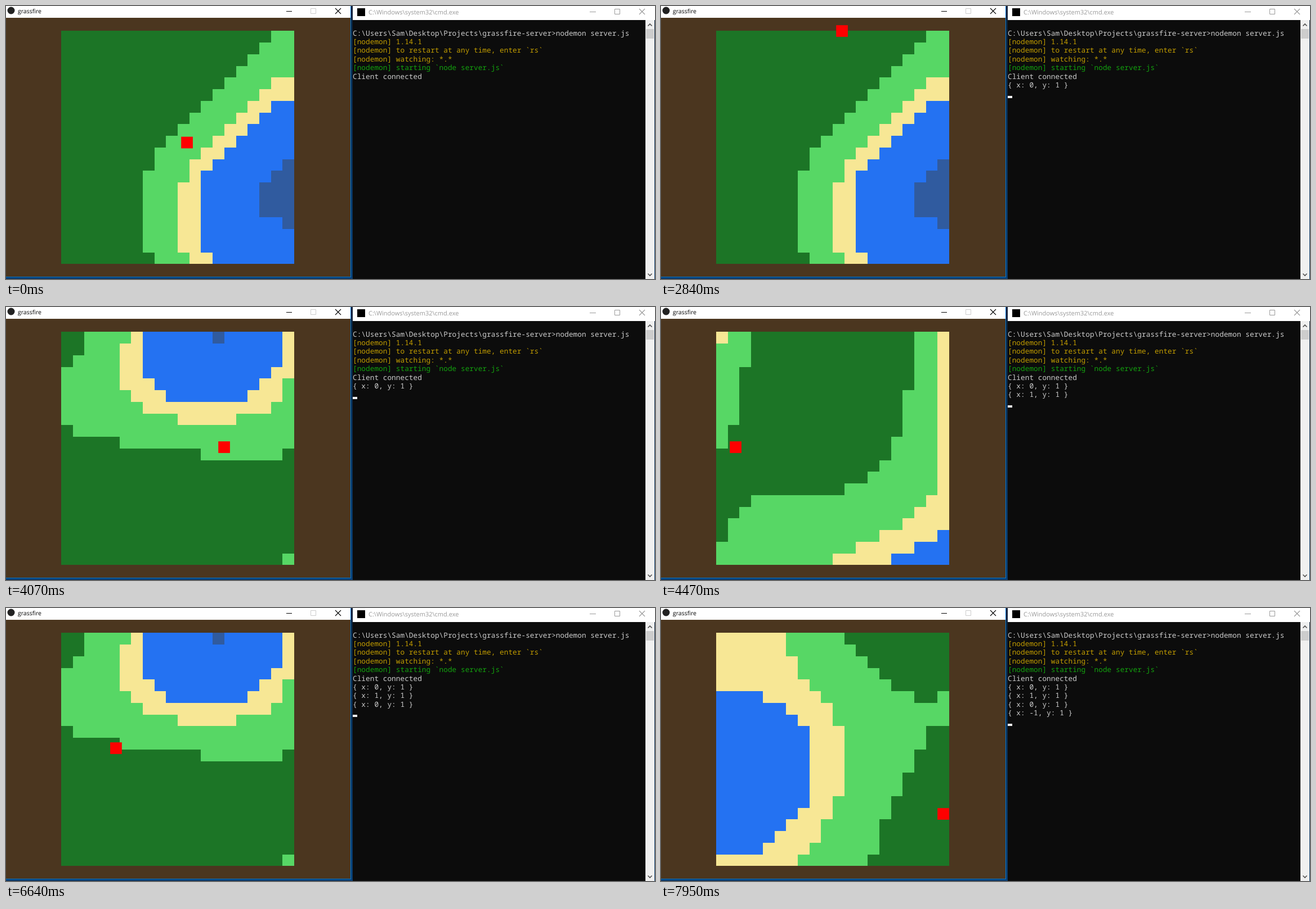
An HTML page with a canvas for the animation above (8 s loop, 1153x486 px).

```html
<!DOCTYPE html>
<html lang="en">
<head>
<meta charset="utf-8">
<title>grassfire</title>
<style>
  html, body { margin: 0; width: 100%; height: 100%; overflow: hidden; background: #0c0c0c; }
  canvas { display: block; }
</style>
</head>
<body>
<canvas id="stage" width="1153" height="486"></canvas>
<script>
const ctx = document.getElementById('stage').getContext('2d');
const LOOP = 8000;
const TICK = 77;   // ms between two moves of the player
const CELL = 20.7;

const DARK = '#1c7526', GRASS = '#57d765', SAND = '#f7e795', WATER = '#2472f2', DEEP = '#305b9f';
const UI_FONT = '"Open Sans", "Noto Sans", sans-serif';
const MONO_FONT = '12.8px "Noto Sans Mono", "Liberation Mono", monospace';

// Outlines are in cells of the 20 x 20 board.
const cellX = n => Math.round(98 + CELL * n);
const cellY = n => Math.round(44.3 + 20.75 * n);

function outline(cells) {
  return new Path2D(cells.replace(/([MHV,])(\d+)/g, (_, op, n) =>
    op + (op === 'M' || op === 'H' ? cellX(n) : cellY(n))));
}

function makeMap(base, ...layers) {
  return [[base, 'M0,0H20V20H0Z'], ...layers].map(([color, cells]) => [color, outline(cells)]);
}

const coast = makeMap(DARK,
  [GRASS, 'M20,0H18V1H17V2H16V3H15V4H14V5H13V6H12V7H11V8H10V9H9V10H8V12H7V19H8V20H20Z'],
  [SAND, 'M20,4H18V5H17V6H16V7H15V8H14V9H13V10H12V11H11V13H10V19H11V20H20Z'],
  [WATER, 'M20,6H18V7H17V8H16V9H15V10H14V11H13V12H12V19H13V20H20Z'],
  [DEEP, 'M20,11H19V12H18V13H17V16H19V17H20Z']);

const bay = makeMap(DARK,
  [GRASS, 'M2,0H20V10H19V11H12V10H5V9H1V8H0V3H1V2H2ZM19,19H20V20H19Z'],
  [SAND, 'M6,0H20V4H19V6H18V7H15V8H10V7H7V6H6V5H5V1H6Z'],
  [WATER, 'M7,0H19V3H18V4H17V5H16V6H9V5H8V4H7Z'],
  [DEEP, 'M13,0H14V1H13Z']);

const forest = makeMap(GRASS,
  [DARK, 'M3,0H17V5H16V9H15V11H14V12H13V13H11V14H3V15H2V16H1V18H0V10H1V8H2V3H3Z'],
  [SAND, 'M0,0H1V1H0ZM19,0H20V20H10V19H12V18H14V17H16V16H17V15H18V14H19Z'],
  [WATER, 'M19,17H20V20H15V19H17V18H19Z']);

const lake = makeMap(DARK,
  [GRASS, 'M0,0H11V1H12V2H13V3H14V4H15V5H17V6H19V5H20V8H18V10H17V12H16V14H15V16H14V19H13V20H0Z'],
  [SAND, 'M0,0H6V2H7V4H8V5H9V6H10V8H11V14H10V16H9V18H8V19H7V20H0Z'],
  [WATER, 'M0,5H4V6H6V7H7V8H8V15H7V16H6V17H5V18H4V19H0Z']);

const maps = [[0, coast], [2920, bay], [4470, forest], [5630, bay], [6950, lake]];

// start time, number of ticks, x and y reached at the last tick
const moves = [
  [0, 1, 311, 232.5], [1140, 1, 311, 250], [2150, 7, 311, 50], [2840, 1, 311, 34],
  [2920, 1, 311, 413], [3530, 6, 311, 239], [3990, 2, 377, 239], [4145, 3, 469, 239],
  [4390, 1, 491, 239],
  [4470, 1, 122, 239], [4540, 1, 148, 239], [4940, 3, 230, 239], [5240, 4, 113, 239],
  [5550, 1, 98, 239],
  [5630, 1, 477, 239], [6010, 11, 120, 239], [6870, 1, 98, 239],
  [6950, 1, 466, 239], [7020, 1, 450, 239], [7480, 2, 491, 239], [7710, 4, 491, 356]
];

const PLAIN = '#cccccc', YELLOW = '#c19c00', GREEN = '#13a10e';
const banner = [
  [PLAIN, 'C:\\Users\\Sam\\Desktop\\Projects\\grassfire-server>nodemon server.js'],
  [YELLOW, '[nodemon] 1.14.1'],
  [YELLOW, '[nodemon] to restart at any time, enter `rs`'],
  [YELLOW, '[nodemon] watching: *.*'],
  [GREEN, '[nodemon] starting `node server.js`'],
  [PLAIN, 'Client connected']
];
const messages = [
  [2840, '{ x: 0, y: 1 }'], [4390, '{ x: 1, y: 1 }'],
  [5550, '{ x: 0, y: 1 }'], [6870, '{ x: -1, y: 1 }']
];

function rect(color, x, y, w, h) {
  ctx.fillStyle = color;
  ctx.fillRect(x, y, w, h);
}

function text(color, font, str, x, y) {
  ctx.fillStyle = color;
  ctx.font = font;
  ctx.fillText(str, x, y);
}

function stroke(color, width, d) {
  ctx.strokeStyle = color;
  ctx.lineWidth = width;
  ctx.stroke(new Path2D(d));
}

const desktop = ctx.createLinearGradient(0, 0, 0, 486);
desktop.addColorStop(0, '#0a2038');
desktop.addColorStop(1, '#0a3c6e');

function drawGameWindow() {
  rect(desktop, 0, 0, 1153, 486);
  rect('#4b361f', 0, 0, 612, 482);
  rect('#ffffff', 0, 0, 612, 21);
  rect('#0078d7', 612, 0, 1, 483);
  rect('#0078d7', 0, 482, 613, 1);
  ctx.fillStyle = '#222222';
  ctx.beginPath();
  ctx.arc(9, 8, 6.5, 0, 2 * Math.PI);
  ctx.fill();
  text('#000000', '10.5px ' + UI_FONT, 'grassfire', 21, 13);
  stroke('#000000', 1, 'M498 9.5H508');
  stroke('#cccccc', 1, 'M541.5 4.5h9v9h-9z');
  stroke('#000000', 1.1, 'M585 4l10 10m0-10l-10 10');
}

function drawConsoleWindow() {
  rect('#0c0c0c', 616, 0, 536, 486);
  rect('#ffffff', 616, 0, 537, 25);
  rect('#000000', 624, 4, 14, 14);
  text('#999999', '11px ' + UI_FONT, 'C:\\Windows\\system32\\cmd.exe', 644, 15);
  stroke('#999999', 1, 'M1037 10.5h11M1081.5 5.5h9v9h-9z');
  stroke('#999999', 1.1, 'M1125 5l10 10m0-10l-10 10');
  rect('#f0f0f0', 1136, 25, 16, 461);
  rect('#cdcdcd', 1137, 41, 14, 17);
  stroke('#505050', 1.6, 'M1140.5 35.5l3.5-3.5 3.5 3.5M1140.5 476.5l3.5 3.5 3.5-3.5');
}

function drawConsoleText(t) {
  const sent = messages.filter(([at]) => t >= at).map(([, str]) => [PLAIN, str]);
  const lines = banner.concat(sent);
  lines.forEach(([color, str], i) => text(color, MONO_FONT, str, 616, 52.5 + 15.4 * i));
  if (sent.length) rect('#f2f2f2', 616, Math.round(51.7 + 15.4 * lines.length), 8, 4);
}

function playerAt(t) {
  let x = 311, y = 232.5;
  for (const [start, ticks, toX, toY] of moves) {
    if (t < start) break;
    const done = Math.min(1, (Math.floor((t - start) / TICK) + 1) / ticks);
    x += (toX - x) * done;
    y += (toY - y) * done;
  }
  return [x + 0.2, y + 0.2];
}

function draw(t) {
  drawGameWindow();
  const map = maps.filter(([at]) => t >= at).pop()[1];
  for (const [color, path] of map) {
    ctx.fillStyle = color;
    ctx.fill(path);
  }
  rect('#ff0000', ...playerAt(t), CELL, CELL);
  drawConsoleWindow();
  drawConsoleText(t);
}

ctx.textRendering = 'geometricPrecision';
const begin = performance.now();
function frame() {
  draw((performance.now() - begin) % LOOP);
  requestAnimationFrame(frame);
}
frame();
</script>
</body>
</html>
```
